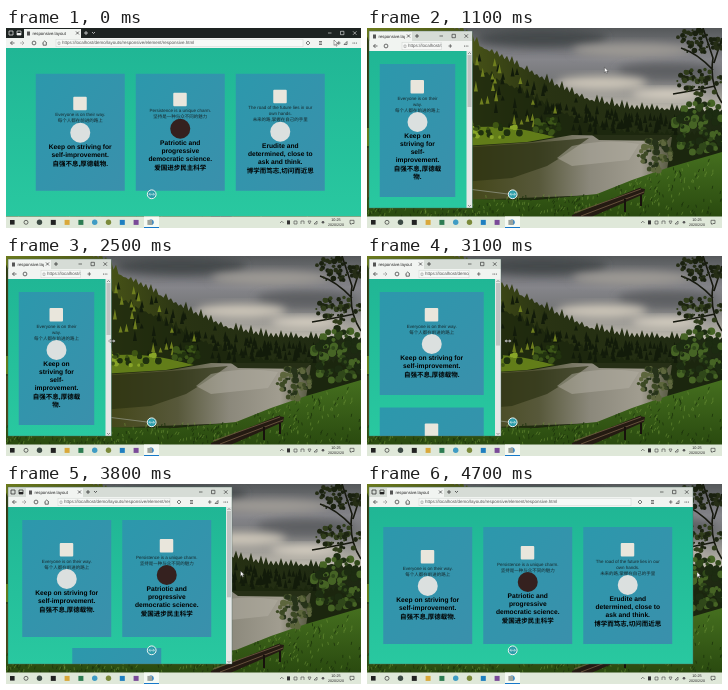
Recreate the animation shown at these times as an HTML page. Size 355x200 px, loop 4750 ms.

```html
<!DOCTYPE html>
<html lang="en">
<head>
<meta charset="utf-8">
<title>Responsive cards</title>
<style>
html, body { margin: 0; width: 100%; height: 100%; overflow: hidden; background: #1d2418; }
svg { display: block; width: 100vw; height: 100vh; }
text { font-family: "Liberation Sans", Arial, "Noto Sans CJK SC", "Noto Sans CJK", sans-serif; text-rendering: geometricPrecision; }
</style>
</head>
<body>
<svg viewBox="0 0 355 200">
  <defs>
    <linearGradient id="sky" x2="0" y2="1"><stop stop-color="#55585a"/><stop offset=".35" stop-color="#85858a"/><stop offset=".55" stop-color="#77787a"/><stop offset="1" stop-color="#d0cabb"/></linearGradient>
    <linearGradient id="forest"><stop stop-color="#6b7a1c"/><stop offset=".3" stop-color="#465117"/><stop offset=".5" stop-color="#293313"/><stop offset="1" stop-color="#1d2812"/></linearGradient>
    <linearGradient id="lake" gradientUnits="userSpaceOnUse" x1="100" x2="305"><stop stop-color="#434618"/><stop offset=".35" stop-color="#57583a"/><stop offset=".6" stop-color="#8b887b"/><stop offset=".85" stop-color="#a19d90"/><stop offset="1" stop-color="#50533a"/></linearGradient>
    <linearGradient id="grass" x2="0" y2="1"><stop stop-color="#456f1f"/><stop offset="1" stop-color="#29490f"/></linearGradient>
    <linearGradient id="page" x2="0" y2="1"><stop stop-color="#20b695"/><stop offset="1" stop-color="#29c8a0"/></linearGradient>
    <linearGradient id="card" x2="1" y2="1"><stop stop-color="#2c98ac"/><stop offset="1" stop-color="#3a90ac"/></linearGradient>
    <filter id="soft" x="-20%" y="-40%" width="140%" height="180%"><feGaussianBlur stdDeviation="4"/></filter>
  </defs>
  <g id="desktop"></g>
  <g id="window"></g>
  <g id="shell"></g>
  <g id="pointer"></g>
</svg>
<script>
const LOOP = 4750, STEP = 100;
const layer = id => document.getElementById(id);
const pen = document.createElement('canvas').getContext('2d');

const rect = (x, y, w, h, fill, extra = '') =>
  `<rect x="${x}" y="${y}" width="${Math.max(0, w)}" height="${Math.max(0, h)}" fill="${fill}" ${extra}/>`;
const disc = (x, y, r, fill, extra = '') => `<circle cx="${x}" cy="${y}" r="${r}" fill="${fill}" ${extra}/>`;
const path = (d, fill, extra = '') => `<path d="${d}" fill="${fill}" ${extra}/>`;
const line = (d, color = '#333', width = .7) => path(d, 'none', `stroke="${color}" stroke-width="${width}"`);
const label = (s, x, y, size, extra = '') =>
  `<text x="${x}" y="${y + size * .35}" font-size="${size}" ${extra}>${s}</text>`;

function seeded(seed) {
  return () => (seed = (seed * 16807) % 2147483647) / 2147483647;
}

function track(t, keys) {
  if (t <= keys[0][0]) return keys[0][1];
  for (let i = 1; i < keys.length; i++) {
    const [t0, a] = keys[i - 1], [t1, b] = keys[i];
    if (t <= t1) return a + (b - a) * (t - t0) / (t1 - t0);
  }
  return keys[keys.length - 1][1];
}

// ---- desktop picture ----
const SKYLINE = [[0, -10], [95, 2], [112, 18], [135, 30], [160, 43], [190, 59], [220, 72], [260, 81], [355, 84]];

function treeline(lift, depth, rnd) {
  let d = 'M0 190';
  for (let x = 0; x <= 355; x += 2.5) {
    const spike = x / 2.5 % 2 ? 0 : depth * rnd();
    d += `L${x} ${(track(x, SKYLINE) + lift - spike).toFixed(1)}`;
  }
  return d + 'L355 190Z';
}

// Conifers as narrow triangles, sunlit towards the left.
function conifers(n, rnd) {
  let dark = '', lit = '';
  for (let i = 0; i < n; i++) {
    const x = 95 + rnd() * 215, top = track(x, SKYLINE) + 2;
    const y = top + rnd() * (98 - top), h = 5 + rnd() * 6;
    const tree = `M${x.toFixed(1)} ${y.toFixed(1)}l2 ${h.toFixed(1)}h-4z`;
    if (rnd() * 130 > x - 70) lit += tree; else dark += tree;
  }
  return path(dark, '#121b0a') + path(lit, '#6f7f1f');
}

function blobs(n, x, y, w, h, size, colors, rnd) {
  let out = '';
  for (let i = 0; i < n; i++) {
    const a = rnd() * 6.3, q = Math.sqrt(rnd());
    out += disc((x + w * q * Math.cos(a)).toFixed(1), (y + h * q * Math.sin(a)).toFixed(1),
      (size * (.5 + rnd())).toFixed(1), colors[i % colors.length]);
  }
  return out;
}

function blades(n, rnd) {
  let d = '';
  for (let i = 0; i < n; i++) {
    const x = rnd() * 355;
    const top = track(x, [[0, 172], [230, 168], [290, 145], [355, 130]]);
    d += `M${x.toFixed(1)} ${(top + rnd() * (190 - top)).toFixed(1)}l${(rnd() * 3 - 1).toFixed(1)} -3`;
  }
  return d;
}

function desktop() {
  const rnd = seeded(71);
  const cloud = (x, y, rx, ry, fill) =>
    `<ellipse cx="${x}" cy="${y}" rx="${rx}" ry="${ry}" fill="${fill}" filter="url(#soft)"/>`;
  return rect(0, 0, 355, 90, 'url(#sky)') +
    cloud(175, 10, 65, 9, '#45484b') + cloud(265, 22, 60, 7, '#9d9a94') +
    cloud(300, 43, 50, 8, '#5d5f62') + cloud(235, 55, 45, 7, '#cbc4b7') + cloud(300, 66, 35, 5, '#d9d2c4') +
    path(treeline(0, 9, rnd), 'url(#forest)') +
    path(treeline(24, 8, rnd), '#1a240d', 'opacity=".75"') + conifers(170, rnd) +
    path('M0 100H95Q135 96 168 104L188 109 160 114 95 118H0Z', '#627d19') +
    blobs(32, 122, 103, 32, 7, 2.4, ['#3f5613', '#88a528', '#1f300e'], rnd) +
    path('M0 120L95 119 165 114 205 107 305 109 300 142 230 167 0 176Z', 'url(#lake)') +
    path('M95 120L165 115 222 110Q200 126 180 138L145 150 95 154Z', '#2a3012', 'opacity=".65"') +
    path('M205 118Q240 110 272 116L262 132 205 138 190 130Z', '#b3afa3', 'opacity=".5"') +
    path('M225 107H305L300 113 232 112Z', '#262f16') +
    blobs(26, 180, 98, 14, 8, 2.6, ['#3c5518', '#22330f'], rnd) +
    path('M0 170L170 172 230 166 265 152 300 140 355 124V190H0Z', 'url(#grass)') +
    line(blades(170, rnd), '#1c330c', .8) + line(blades(200, rnd), '#73983a', .5) +
    blobs(60, 288, 127, 17, 16, 2.3, ['#27331a', '#3d4a25', '#5d663d'], rnd) +
    blobs(110, 335, 100, 28, 28, 2.8, ['#1c2b11', '#30481a', '#466425'], rnd) +
    line('M355 75Q342 55 346 30L336 0M346 42Q330 25 314 20M347 35L355 10M348 58Q330 62 306 66', '#17190f', 1.6) +
    blobs(70, 332, 14, 26, 13, 1.9, ['#1a2110', '#252d16'], rnd) +
    blobs(60, 334, 54, 24, 13, 1.9, ['#1d2511', '#303d1b'], rnd) +
    line('M101 161L141 166', '#a5aaa0', .6) +
    path('M205 187L272 160 278 161 277 166 222 190H205Z', '#241a12') +
    line('M207 185L274 161M214 188L277 164', '#6d5640', .9) +
    line('M258 171V184M274 167V178', '#17110c', 2);
}

// ---- page ----
const CARDS = [
  { say: 'Everyone is on their way.', zh: '每个人都在前进的路上', motto: 'Keep on striving for self-improvement.', mottoZh: '自强不息,厚德载物.', badge: '#dbe0df' },
  { say: 'Persistence is a unique charm.', zh: '坚持是一种与众不同的魅力', motto: 'Patriotic and progressive democratic science.', mottoZh: '爱国进步民主科学', badge: '#35211f' },
  { say: 'The road of the future lies in our own hands.', zh: '未来的路,掌握在自己的手里', motto: 'Erudite and determined, close to ask and think.', mottoZh: '博学而笃志,切问而近思', badge: '#dbe0df' }
];
const SMALL = 4.5, BOLD = 6.67, BOLD_ZH = 6.5;

function wrap(s, size, weight, width) {
  pen.font = `${weight} 100px "Liberation Sans", Arial, "Noto Sans CJK SC", "Noto Sans CJK", sans-serif`;
  const lines = [''];
  for (const token of s.match(/[\u4e00-\u9fff][,.]?|[^\s\u4e00-\u9fff-]+-?|\s/g)) {
    const last = lines.length - 1;
    if (lines[last] && pen.measureText((lines[last] + token).trim()).width * size / 100 > width) lines.push(token.trim());
    else lines[last] += token;
  }
  return lines.map(l => l.trim()).filter(Boolean);
}

function compose(card, width) {
  const say = [...wrap(card.say, SMALL, 400, width), card.zh];
  const motto = wrap(card.motto, BOLD, 700, width);
  const mottoZh = wrap(card.mottoZh, BOLD_ZH, 700, width);
  return { say, motto, mottoZh, badge: card.badge, height: 35 + 6 * say.length + 8 * (motto.length + mottoZh.length) };
}

function drawCard(c, x, y, w, h) {
  const mid = x + w / 2;
  let top = y + (h - c.height) / 2;
  let out = rect(x, y, w, h, 'url(#card)') + rect(mid - 7, top, 13.5, 13.5, '#e9e6dc', 'rx="1"');
  top += 15;
  for (const s of c.say) { out += label(s, mid, top + 3, SMALL, 'fill="#17282c"'); top += 6; }
  out += disc(mid, top + 9, 10, c.badge);
  top += 19;
  for (const s of c.motto) { out += label(s, mid, top + 4, BOLD, 'font-weight="700"'); top += 8; }
  top += 1;
  for (const s of c.mottoZh) { out += label(s, mid, top + 4, BOLD_ZH, 'font-weight="700"'); top += 8; }
  return out;
}

function page(left, top, right, bottom) {
  const inner = right - left - 6.5, height = bottom - top;
  const narrow = inner < 156;
  const cols = inner >= 300 ? 3 : inner >= 200 ? 2 : 1;
  const w = narrow ? inner - 21.5 : 89, gap = narrow ? 12.5 : 11;
  const cards = CARDS.map(c => compose(c, w - (narrow ? 26.5 : 20)));
  const tallest = Math.max(...cards.map(c => c.height));
  const heights = cards.map(c => (narrow ? c.height : tallest) + 32);
  const rows = Math.ceil(3 / cols);
  const total = narrow ? heights.reduce((a, b) => a + b + gap) : rows * heights[0] + (rows - 1) * gap;
  let y = top + Math.max(13, (height - total) / 2);
  let out = rect(left, top, right - left, height, 'url(#page)') + '<g text-anchor="middle">';
  for (let i = 0; i < 3; i += cols) {
    const row = cards.slice(i, i + cols);
    const x = left + (inner - row.length * w - (row.length - 1) * gap) / 2;
    row.forEach((c, k) => out += drawCard(c, x + k * (w + gap), y, w, heights[i]));
    y += heights[i] + gap;
  }
  out += '</g>';
  if (total + 26 > height) {
    out += rect(right - 6, top, 6, height, '#e5e8e6') +
      rect(right - 5, top + 4, 4, (height - 8) * height / (total + 26), '#bfc3c1') +
      line(`M${right - 4.5} ${top + 3}l1.5 -1.5 1.5 1.5M${right - 4.5} ${bottom - 3}l1.5 1.5 1.5 -1.5`, '#555', .6);
  }
  return out;
}

// ---- browser window ----
function browser({ left, top, right, bottom, full }) {
  const width = right - left, wide = width > 150, tiny = width < 115;
  const mark = full ? '#eee' : '#222';
  const ty = top + 5, by = top + 15;
  const tabX = left + (wide ? 18 : 1), tabW = wide ? 57 : tiny ? 42 : 54, tabEnd = tabX + tabW;
  const urlX = left + (tiny ? 33 : 50), urlEnd = right - (full ? 58 : wide ? 62 : tiny ? 31 : 32);
  const bar = full ? '#1d2321' : '#d6dcd6';
  let out = `<clipPath id="frame">${rect(left, top, width, bottom - top, '#000')}</clipPath>
    <clipPath id="tab">${rect(tabX, top, tabW - 7, 10, '#000')}</clipPath>
    <clipPath id="url">${rect(urlX, top + 10, urlEnd - urlX, 10, '#000')}</clipPath><g clip-path="url(#frame)">`;
  out += page(left, top + 20, right, bottom) + rect(left, top, width, 10, bar) +
    rect(tabX, top + 1, tabW, 9, '#f1f4f1') + rect(left, top + 10, width, 10, '#f1f4f1');
  if (wide) out += line(`M${left + 3} ${ty - 2}h4v4h-4zM${left + 11} ${ty - 2}h4v4h-4z`, mark) + rect(left + 11, ty, 4, 2, mark);
  out += rect(tabX + 3, ty - 1.5, 3, 4, '#555') +
    label('responsive.layout', tabX + 8.5, ty, 4.3, 'fill="#222" clip-path="url(#tab)"') +
    line(`M${tabEnd - 5} ${ty - 1.5}l3 3m0 -3l-3 3`) +
    line(`M${tabEnd + 3} ${ty}h4m-2 -2v4`, mark);
  if (wide) out += line(`M${tabEnd + 11} ${ty - 1}l1.5 1.5 1.5 -1.5`, mark);
  out += line(`M${right - 33} ${ty}h3.5M${right - 20.5} ${ty - 1.7}h3.4v3.4h-3.4zM${right - 8} ${ty - 1.7}l3.5 3.5m0 -3.5l-3.5 3.5`, mark, .6);

  const reloadX = left + (tiny ? 17 : 28);
  out += line(`M${left + 8.5} ${by}h-4m2 -2l-2 2 2 2`) +
    disc(reloadX, by, 1.9, 'none', 'stroke="#333" stroke-width=".7"');
  if (!tiny) {
    out += line(`M${left + 14} ${by}h4m-2 -2l2 2 -2 2`, '#999') +
      line(`M${left + 36.5} ${by}l2.2 -2 2.2 2m-3.8 -.3v2.5h3.2v-2.5`);
  }
  out += rect(urlX, top + 11.2, urlEnd - urlX, 7.6, '#f7f9f7', 'stroke="#c9cdca" stroke-width=".4"') +
    line(`M${urlX + 2} ${by - 1}h2v2.4h-2z`, '#888', .5) +
    label('https://localhost/demo/layouts/responsive/element/responsive.html', urlX + 6, by - .6, 4.5, 'fill="#555" clip-path="url(#url)"');
  out += line(`M${right - 24} ${by}h3.5m-1.7 -1.8v3.6`, '#444') +
    [-8, -6.3, -4.6].map(dx => disc(right + dx, by, .5, '#333')).join('');
  if (wide) {
    out += line(`M${right - 55} ${by}l2 -2 2 2 -2 2zM${right - 42} ${by - 1.5}h3m-3 1.5h3m-3 1.5h3M${right - 17} ${by + 1.5}l3 -3v3z`, '#444');
  }
  return out + '</g>' + rect(left, top, width, bottom - top, 'none', full ? '' : 'stroke="#4d6b60" stroke-width=".4"');
}

// ---- taskbar and floating button ----
function shell() {
  const apps = ['#3c4a44', '#222', '#d9a83a', '#2d7c52', '#3f9cc4', '#7b8a3a', '#1f7fc0', '#7a4a98', '#9da39c'];
  const round = [0, 4, 5];
  let out = rect(0, 188.5, 355, 11.5, '#dfe8d9') + rect(138, 188.5, 15, 11.5, '#f6faf3') +
    rect(138, 199, 15, 1, '#1779c9') + rect(4, 192, 4.6, 4.6, '#222') +
    disc(20, 194.3, 2, 'none', 'stroke="#333" stroke-width=".7"') + disc(145, 194.3, 2.7, '#1779c9');
  apps.forEach((color, i) => {
    const x = 33.5 + i * 13.8;
    out += round.includes(i) ? disc(x, 194.3, 2.7, color) : rect(x - 2.5, 191.9, 5, 5, color);
  });
  out += line('M274 195l1.8 -1.8 1.8 1.8M288 193h3v3h-3zM295 196v-3h3v3M302 193h3l-1.5 3zM308 196l3 -3v3z', '#444', .6) +
    rect(281, 192.4, 3, 4, '#333') + disc(317, 194.3, 1.3, '#555') +
    `<g text-anchor="middle" fill="#222">${label('10:25', 330, 191.9, 3.8)}${label('2020/2/20', 330, 196.8, 3.6)}</g>` +
    line('M344 192.3h4v3.2h-2l-1 1v-1h-1z', '#333', .6);
  return out + disc(145.7, 166.3, 4.4, '#2d9daa', 'stroke="#eef4f2" stroke-width="1"') +
    line('M143 166.3h5.4m-4 -1.4l-1.4 1.4 1.4 1.4m2.6 -2.8l1.4 1.4 -1.4 1.4', '#dff0ee', .6);
}

// The dragged edge trails the pointer, more so at higher speed.
const edgeAt = t => track(t, [[2600, 105.5], [2800, 109], [3000, 122], [3100, 134], [3800, 226], [4250, 284], [4700, 326]]);
const lagAt = t => track(t, [[2500, .5], [3100, 7], [3800, 8.5], [4700, 4]]);

function pointer(t) {
  const x = t < 2500
    ? track(t, [[0, 328], [400, 336], [800, 336], [1500, 106]])
    : edgeAt(t) + lagAt(t);
  const y = track(t, [[0, 12], [400, 5], [800, 5], [1500, 85], [3100, 85], [3800, 87], [4700, 88]]);
  const edges = 'stroke="#222" stroke-width=".4"';
  return t < 1500 || t >= 3700
    ? path(`M${x} ${y}v5.4l1.3 -1.2 .9 2 .9 -.4 -.9 -2h1.7z`, '#fff', edges)
    : path(`M${x - 3.4} ${y}l2 -1.7v1.1h2.8v-1.1l2 1.7 -2 1.7v-1.1h-2.8v1.1z`, '#fff', edges);
}

function windowAt(t) {
  if (t < 700) return browser({ left: 0, top: 0, right: 355, bottom: 188.5, full: true });
  const body = browser({ left: 2, top: 3, right: edgeAt(t), bottom: 180, full: false });
  // The restore animation is still slightly oversized on its first step.
  return t < 800 ? `<g transform="translate(-7.1 -6.1) scale(1.03)">${body}</g>` : body;
}

layer('desktop').innerHTML = desktop();
layer('shell').innerHTML = shell();

const start = performance.now();
let shown = -1;
function frame() {
  const t = Math.floor((performance.now() - start) % LOOP / STEP) * STEP;
  if (t !== shown) {
    shown = t;
    layer('window').innerHTML = windowAt(t);
    layer('pointer').innerHTML = pointer(t);
  }
  requestAnimationFrame(frame);
}
frame();
</script>
</body>
</html>
```
